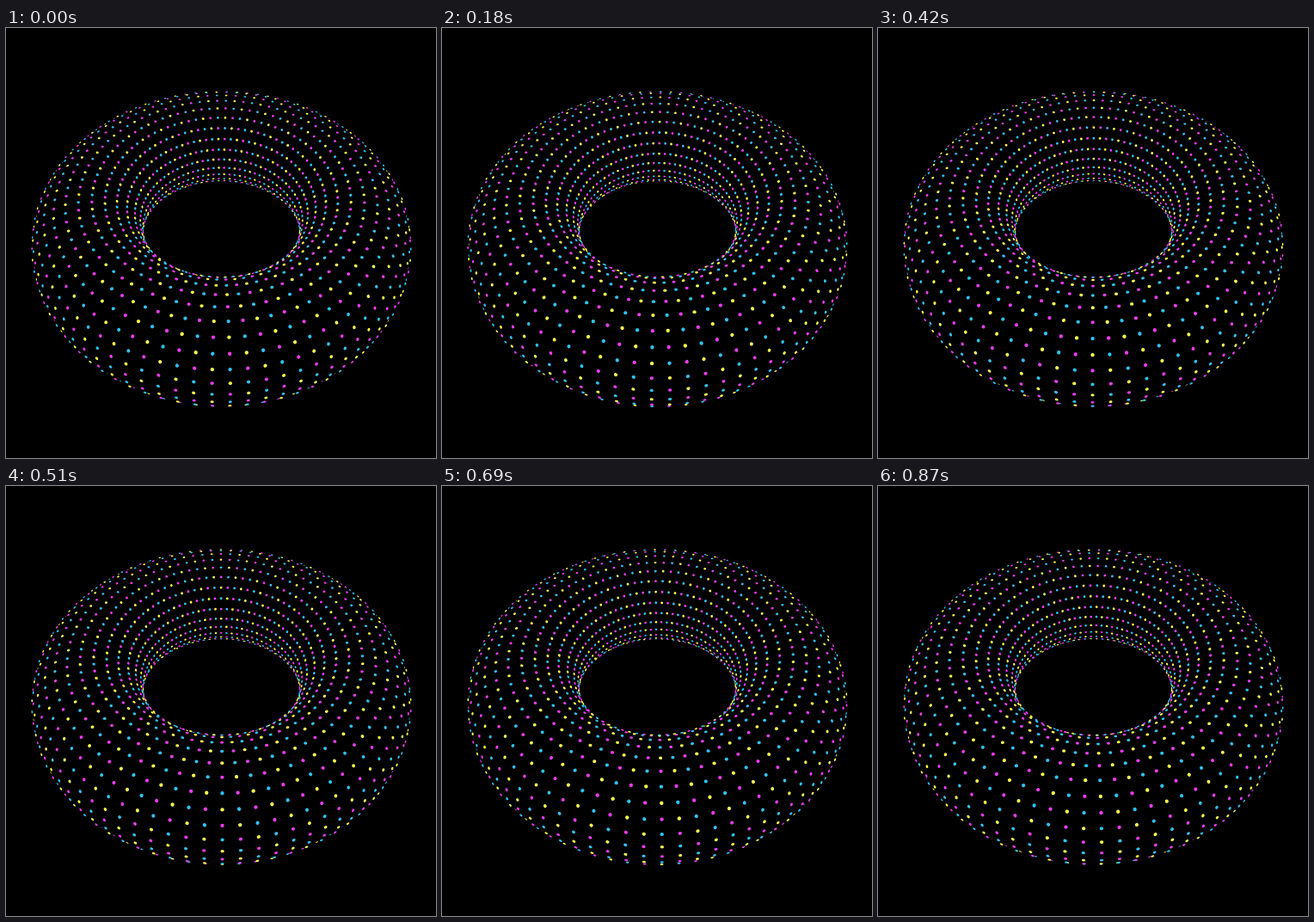
Write an HTML page with a canvas that moves like this. It is 500 by 500 pixels and loops after 0.9 s.

```html
<!DOCTYPE html>
<html lang="en">
<head>
<meta charset="utf-8">
<title>Dotted torus</title>
<style>
  html, body { margin: 0; width: 100%; height: 100%; overflow: hidden; background: #000; }
  canvas { display: block; width: 500px; height: 500px; }
</style>
</head>
<body>
<canvas id="stage"></canvas>
<script>
const SIZE = 500, CENTER = 250.5, LOOP = 900, STEP = 30;
const COLS = 84, ROWS = 28, FIRST_ROW = -9; // the colour seam stays on the hidden underside
const TUBE = 0.39;                          // tube radius, ring radius is 1
const FOCAL = 503.5, DIST = 3.35, LIFT = 0.1815;
const SIN = 0.79, COS = Math.sqrt(1 - SIN * SIN);
const DOT = 0.0102;
const COLORS = ['#ffff50', '#2fc4f5', '#f03df5'];
const TAU = Math.PI * 2;
const COL_PHASE = -0.515, ROW_PHASE = 0.17;

const canvas = document.getElementById('stage');
const ratio = window.devicePixelRatio || 1;
canvas.width = canvas.height = SIZE * ratio;
const ctx = canvas.getContext('2d');
ctx.scale(ratio, ratio);

// Tilt a vector (side, height, front) into camera axes (right, up, near).
const tilt = (x, h, f) => [x, h * COS - f * SIN, h * SIN + f * COS];

// A small ball sitting half sunk in the surface of the black torus.
function drawDot(phi, theta) {
  const c = Math.cos(theta), s = Math.sin(theta);
  const sp = Math.sin(phi), cp = Math.cos(phi);
  const ring = 1 + TUBE * c;
  const [px, py, pz] = tilt(ring * sp, TUBE * s, ring * cp);
  const [nx, ny, nz] = tilt(c * sp, s, c * cp);

  const ex = -px, ey = -LIFT - py, ez = DIST - pz;
  const facing = (nx * ex + ny * ey + nz * ez) / Math.hypot(ex, ey, ez);

  // Inner limit of the visible cap: the sunk rim, or the torus edge in front of it.
  const inner = facing > 0
    ? -DOT * facing
    : TUBE * (1 - Math.sqrt(Math.max(0, 1 - facing * facing)));
  if (inner >= DOT) return;

  const scale = FOCAL / ez;
  const angle = Math.atan2(-ny, nx);
  const shift = (DOT + inner) / 2 * scale;
  const thick = (DOT - inner) / 2 * scale;
  const wide = (inner > 0 ? Math.sqrt(DOT * DOT - inner * inner) : DOT) * scale;
  const x = CENTER + px * scale + Math.cos(angle) * shift;
  const y = CENTER - (py + LIFT) * scale + Math.sin(angle) * shift;
  ctx.beginPath();
  ctx.ellipse(x, y, thick, wide, angle, 0, TAU);
  ctx.fill();
}

function draw(ms) {
  const p = Math.floor(ms % LOOP / STEP) * STEP / LOOP;
  ctx.fillStyle = '#000';
  ctx.fillRect(0, 0, SIZE, SIZE);
  for (let i = 0; i < COLS; i++) {
    const phi = (i + COL_PHASE + p) * TAU / COLS;
    for (let j = FIRST_ROW; j < FIRST_ROW + ROWS; j++) {
      ctx.fillStyle = COLORS[(i + j + 30) % 3];
      drawDot(phi, (j + ROW_PHASE + 2 * p) * TAU / ROWS);
    }
  }
}

const start = performance.now();
function tick() {
  draw(performance.now() - start);
  requestAnimationFrame(tick);
}
tick();
</script>
</body>
</html>
```
